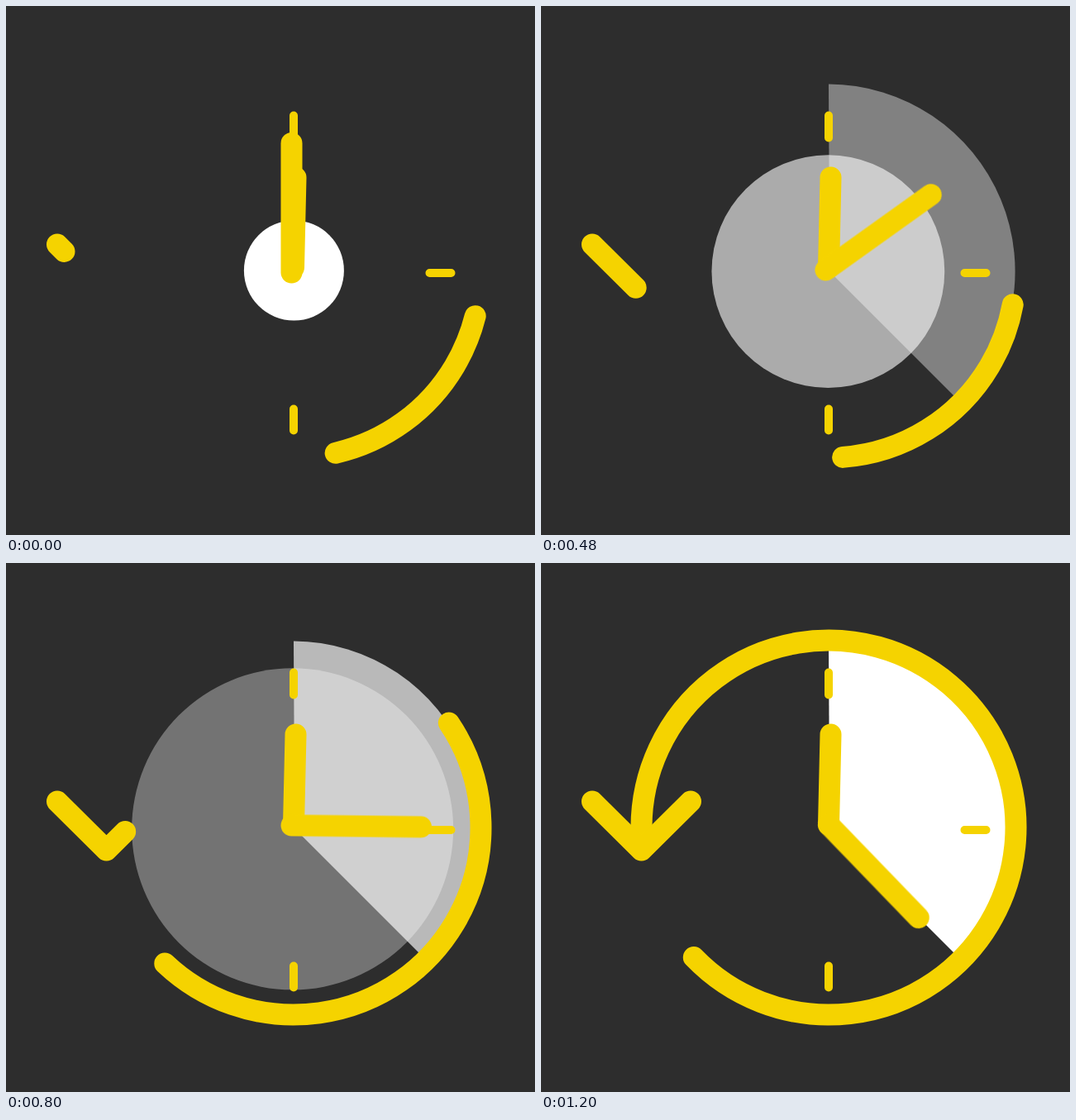
Write an HTML page that moves like this. It is 640x640 px and loops after 2080 ms.

```html
<!DOCTYPE html>
<html lang="en">
<head>
<meta charset="utf-8">
<title>Clock with turning arrow</title>
<style>
  @property --head { syntax: "<number>"; inherits: false; initial-value: 59; }
  @property --tail { syntax: "<number>"; inherits: false; initial-value: 122; }

  html, body { margin: 0; height: 100%; overflow: hidden; background: #2d2d2d; }
  svg { display: block; width: 100vw; height: 100vh; }

  .lines { fill: none; stroke: #f5d300; stroke-width: 26; stroke-linecap: round; stroke-linejoin: round; }
  .ticks { stroke-width: 10; }
  .pulse, .wedge { fill: #fff; }

  /* 15 steps of 80 ms, then a hold until 2080 ms */
  .pulse, .wedge, .minute, .arrow { animation: 2080ms steps(15) infinite; }
  .pulse { animation-name: grow; }
  .wedge { animation-name: appear; }
  .minute { animation-name: turn; transform-origin: 348px 320px; }
  .arrow { animation-name: draw; }

  /* The two ends of the ring pass each other, so the dash spans whichever comes first */
  .ring {
    --from: min(var(--head), var(--tail));
    --to: max(var(--head), var(--tail));
    stroke-dasharray: calc((var(--to) - var(--from)) * 1px) 999px;
    stroke-dashoffset: calc(var(--from) * -1px);
    animation: sweep 2080ms infinite;
  }

  @keyframes grow {
    from { cx: 348.4px; cy: 320px; r: 60.5px; opacity: 1; }
    57.6923%, to { cx: 345.8px; cy: 322.8px; r: 261.5px; opacity: 0; }
  }
  @keyframes appear {
    from { opacity: 0; }
    57.6923%, to { opacity: 1; }
  }
  @keyframes turn {
    from { transform: rotate(0deg); }
    57.6923%, to { transform: rotate(136deg); }
  }
  @keyframes draw {
    from { stroke-dasharray: 8.5px 999px; }
    57.6923%, to { stroke-dasharray: 119px 999px; }
  }
  @keyframes sweep {
    from { --head: 59; --tail: 122; animation-timing-function: steps(10); }
    38.4615% { --head: 170; --tail: 2.7; animation-timing-function: steps(5); }
    57.6923%, to { --head: 316; --tail: 0; }
  }
</style>
</head>
<body>
<svg viewBox="0 0 640 640">
  <circle class="pulse" cx="348.4" cy="320" r="60.5"/>
  <path class="wedge" d="M348 94.5A226.5 226.5 0 0 1 508.2 480.2L349.2 321.2Z"/>
  <g class="lines">
    <path class="ticks" d="M348 132.5V159.5M512.5 323H538.5M348 487.5V513.5"/>
    <path d="M350.5 207.5L348 316.5"/>
    <path class="minute" d="M345.5 166V322.5"/>
    <path class="ring" pathLength="316" d="M184.8 477.1A226.5 226.5 0 1 0 121.5 320"/>
    <path class="arrow" pathLength="119" d="M62 288.5L121.5 347.5L181 288.5"/>
  </g>
</svg>
</body>
</html>
```
